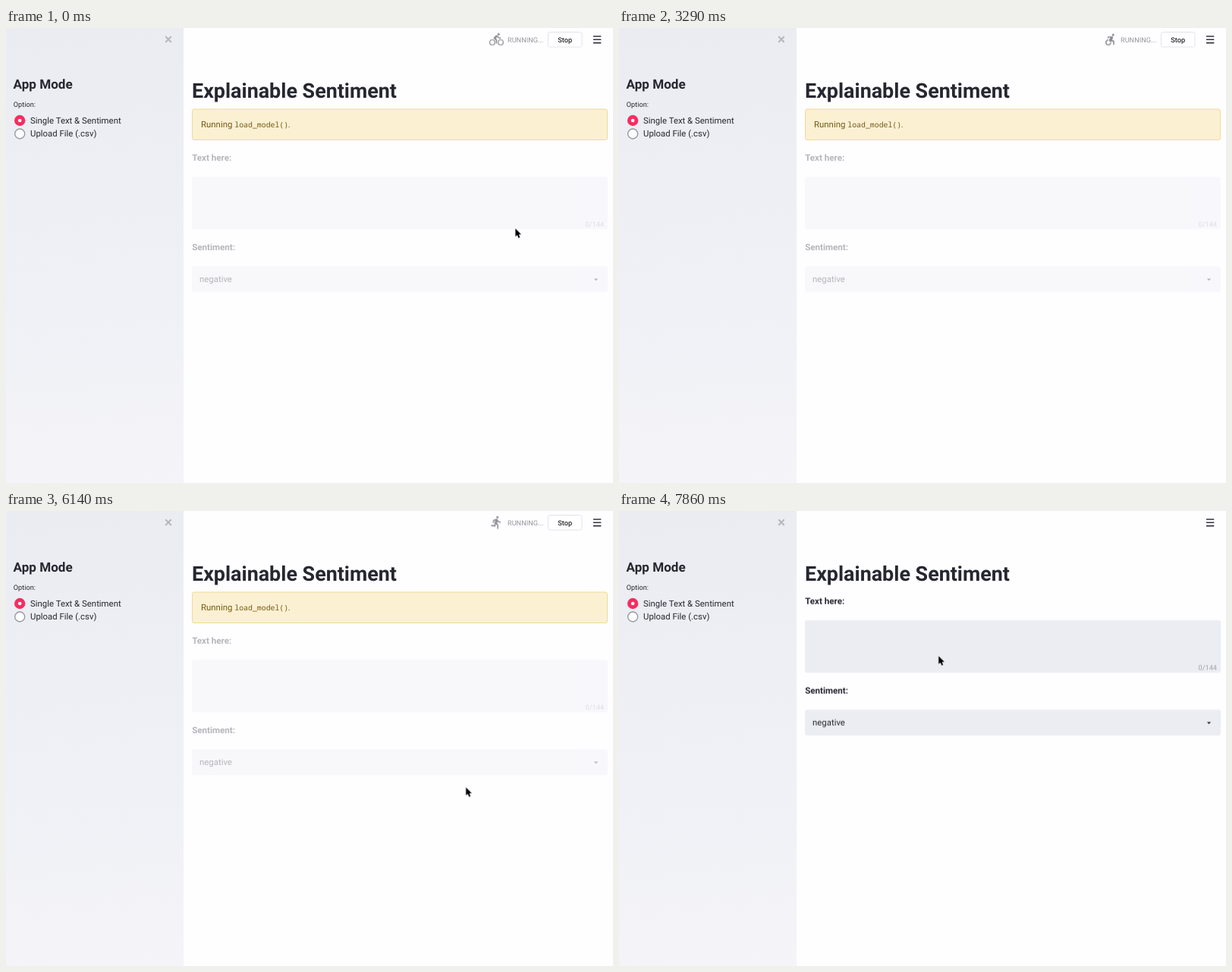
An HTML page for the animation above (8 s loop, 800 by 600 pixels).

```html
<!DOCTYPE html>
<html lang="en">
<head>
<meta charset="utf-8">
<title>Explainable Sentiment</title>
<style>
  html, body { margin: 0; width: 100%; height: 100%; overflow: hidden; background: #fefdff; }
  .sidebar {
    position: absolute; left: 0; top: 0; width: 234px; height: 600px;
    background: linear-gradient(174deg, #ebecf2, #eff1f6 60%, #f5f4f8);
  }
  svg { position: absolute; left: 0; top: 0; display: block; }
  text { font: 11.4px Roboto, "Noto Sans", sans-serif; fill: #262730; text-rendering: geometricPrecision; }
  .h1 { font-size: 26.9px; font-weight: 700; }
  .h2 { font-size: 17.1px; font-weight: 700; }
  .label { font-size: 11.6px; font-weight: 700; }
  .small { font-size: 9.2px; }
  .muted { fill: #a0a1a8; }
  .stop { font-size: 9.2px; font-weight: 500; }
  .notice text { fill: #735c14; }
  .notice .code { font: 9.86px "Noto Sans Mono", "DejaVu Sans Mono", monospace; }
  .field { fill: #ecedf2; }
  .icon { fill: #8d8e93; }
  .wave { fill: none; stroke: #8d8e93; stroke-width: 2; }

  /* Hard cuts on the shared 8 s loop */
  .notice, .form, .live, .last, .status, .cursor { animation: 8s step-end infinite; }
  .notice, .live { animation-name: leave; }
  .last { animation-name: arrive; }
  .form { animation-name: refresh; }
  .status { animation-name: fade; }
  .cursor { animation-name: roam; }
  @keyframes leave { 0% { opacity: 1 } 78.625%, 100% { opacity: 0 } }
  @keyframes arrive { 0% { opacity: 0 } 78.625%, 100% { opacity: 1 } }
  @keyframes refresh {
    0% { opacity: .33; transform: none }
    78.625%, 100% { opacity: 1; transform: translateY(-52.3px) }
  }
  @keyframes fade {
    0% { opacity: 1 }
    78.625% { opacity: .25 }
    80.375% { opacity: .1 }
    82.125% { opacity: .03 }
    83.875%, 100% { opacity: 0 }
  }

  /* Five icon changes each second; every new second starts one icon further on */
  .second { animation: second 4s steps(4) infinite; }
  .beat { animation: beat 1s step-end infinite; }
  @keyframes second { to { transform: translateX(-160px) } }
  @keyframes beat {
    0% { transform: none }
    14% { transform: translateX(-40px) }
    29% { transform: translateX(-80px) }
    57% { transform: translateX(-120px) }
    71%, 100% { transform: translateX(-160px) }
  }

  @keyframes roam {
    0% { transform: translate(671px, 264.5px); opacity: 1 }
    1.75% { transform: translate(674px, 274px); opacity: 1 }
    3.625% { transform: translate(677px, 282px); opacity: 1 }
    5.375% { transform: translate(681px, 286px); opacity: 1 }
    7.125% { transform: translate(694px, 284px); opacity: 1 }
    8.875% { transform: translate(732px, 278px); opacity: 1 }
    10.75% { transform: translate(785px, 160px); opacity: 0 }
    60.75% { transform: translate(768px, 152px); opacity: 1 }
    62.5% { transform: translate(680px, 166px); opacity: 1 }
    64.25% { transform: translate(620.5px, 178.5px); opacity: 1 }
    66.125% { transform: translate(614px, 205px); opacity: 1 }
    67.875% { transform: translate(611px, 242px); opacity: 1 }
    69.625% { transform: translate(609px, 275px); opacity: 1 }
    71.375% { transform: translate(607px, 312px); opacity: 1 }
    73.25% { transform: translate(606px, 346px); opacity: 1 }
    75% { transform: translate(605.8px, 364.5px); opacity: 1 }
    94.625% { transform: translate(568px, 332px); opacity: 1 }
    96.375% { transform: translate(480px, 245px); opacity: 1 }
    98.25%, 100% { transform: translate(420.8px, 191.3px); opacity: 1 }
  }
</style>
</head>
<body>
<div class="sidebar"></div>
<svg width="800" height="600" viewBox="0 0 800 600">
  <defs>
    <clipPath id="slot"><rect width="24" height="24"/></clipPath>
    <g id="bike">
      <circle cx="15.5" cy="3.5" r="2"/>
      <g fill="none" stroke="#8d8e93" stroke-width="1.5">
        <circle cx="5" cy="17" r="4.25"/><circle cx="19" cy="17" r="4.25"/>
      </g>
      <path d="M10.8 10.5l2.4-2.4.8.8c1.3 1.3 3 2.1 5.1 2.1V9c-1.5 0-2.7-.6-3.6-1.5l-1.9-1.9c-.5-.4-1-.6-1.6-.6s-1.1.2-1.4.6L7.8 8.4c-.4.4-.6.9-.6 1.4 0 .6.2 1.1.6 1.4L11 14v5h2v-6.2z"/>
    </g>
    <g id="chair">
      <circle cx="18" cy="4.54" r="2"/>
      <path d="M15 17h-2c0 1.65-1.35 3-3 3s-3-1.35-3-3 1.35-3 3-3v-2c-2.76 0-5 2.24-5 5s2.24 5 5 5 5-2.24 5-5zm3-3.5h-1.86l1.67-3.67C18.42 8.5 17.44 7 15.96 7h-5.2c-.81 0-1.54.47-1.87 1.2L8.22 10l1.92.53.65-1.53H13l-1.83 4.1c-.6 1.33.39 2.9 1.85 2.9H18v5h2v-5.5c0-1.1-.9-2-2-2z"/>
    </g>
    <path id="wave" class="wave" d="M2 20c1.7 0 1.7-1 3.33-1s1.7 1 3.33 1 1.7-1 3.34-1 1.7 1 3.33 1 1.7-1 3.33-1 1.7 1 3.34 1"/>
    <g id="swim">
      <circle cx="16.5" cy="5.5" r="2.5"/>
      <path d="M8.67 12c1.2 0 1.5-1 3.34-1s2.1 1 3.33 1c.7 0 1-.3 1.56-.59L10.48 5C8.93 3.45 7.5 2.99 5 3v2.5c1.82 0 2.89.39 4 1.5l1 1-3.25 3.25c.8.3 1 .75 1.92.75z"/>
      <use href="#wave"/><use href="#wave" y="-4.5"/>
    </g>
    <g id="run">
      <circle cx="13.5" cy="3.5" r="2"/>
      <path d="M9.89 19.38l1-4.4 2.1 2v6h2v-7.5l-2.1-2 .6-3c1.3 1.5 3.3 2.5 5.5 2.5v-2c-1.9 0-3.5-1-4.3-2.4l-1-1.6c-.4-.6-1-1-1.7-1-.3 0-.5.1-.8.1l-5.2 2.2v4.7h2v-3.4l1.8-.7-1.6 8.1-4.9-1-.4 2z"/>
    </g>
    <g id="strip">
      <use href="#bike"/><use href="#chair" x="40"/><use href="#swim" x="80"/><use href="#run" x="120"/>
    </g>
  </defs>

  <!-- Sidebar -->
  <path d="M210.3 11.3l7.4 7.4m0-7.4l-7.4 7.4" stroke="#b4b6bc" stroke-width="2"/>
  <text class="h2" x="9.6" y="80">App Mode</text>
  <text class="small" x="9.8" y="104.3">Option:</text>
  <circle cx="18.2" cy="122" r="7.2" fill="#f72d60"/>
  <circle cx="18.2" cy="122" r="2.3" fill="#fff"/>
  <circle cx="18.2" cy="139.5" r="6.5" fill="#fefdff" stroke="#98999f" stroke-width="1.4"/>
  <text x="32" y="125.5">Single Text &amp; Sentiment</text>
  <text x="32" y="143.2">Upload File (.csv)</text>

  <!-- Toolbar -->
  <path d="M774 11h10.3m-10.3 4.3h10.3m-10.3 4.3h10.3" stroke="#33343c" stroke-width="1.6"/>
  <g class="status">
    <g class="icon" transform="translate(637 5.5) scale(.79)">
      <g class="live" clip-path="url(#slot)">
        <g class="second"><g class="beat">
          <use href="#strip"/><use href="#strip" x="160"/>
        </g></g>
      </g>
      <use class="last" href="#swim"/>
    </g>
    <text class="small" x="661" y="19" style="fill:#95969c">RUNNING...</text>
    <rect x="714.5" y="5.5" width="44.5" height="19.5" rx="2.5" fill="#fff" stroke="#e3e4e9"/>
    <text class="stop" x="727.3" y="18.5">Stop</text>
  </g>

  <!-- Main column -->
  <text class="h1" x="245" y="91.5">Explainable Sentiment</text>
  <g class="notice">
    <rect x="245.5" y="107" width="547" height="40.5" rx="2.5" fill="#fcf0d3" stroke="#eddb96"/>
    <text x="257" y="131.3">Running</text>
    <text class="code" x="301.3" y="131.3">load_model()</text>
    <text x="371.8" y="131.3">.</text>
  </g>
  <g class="form">
    <text class="label" x="245.2" y="174.5">Text here:</text>
    <rect class="field" x="245" y="196.2" width="548" height="69.3" rx="3"/>
    <text class="small muted" x="763.6" y="261.6">0/144</text>
    <text class="label" x="245.2" y="292.5">Sentiment:</text>
    <rect class="field" x="245" y="314.2" width="548" height="34" rx="3"/>
    <text x="255" y="335">negative</text>
    <path d="M774.8 330.4h5.4l-2.7 2.8z" fill="#262730"/>
  </g>

  <path class="cursor" d="M.4 0v10.6l2.4-2.2 1.7 4 1.9-.8-1.7-3.9h3.4z" fill="#000" stroke="#fff" stroke-width=".9" paint-order="stroke"/>
</svg>
</body>
</html>
```
